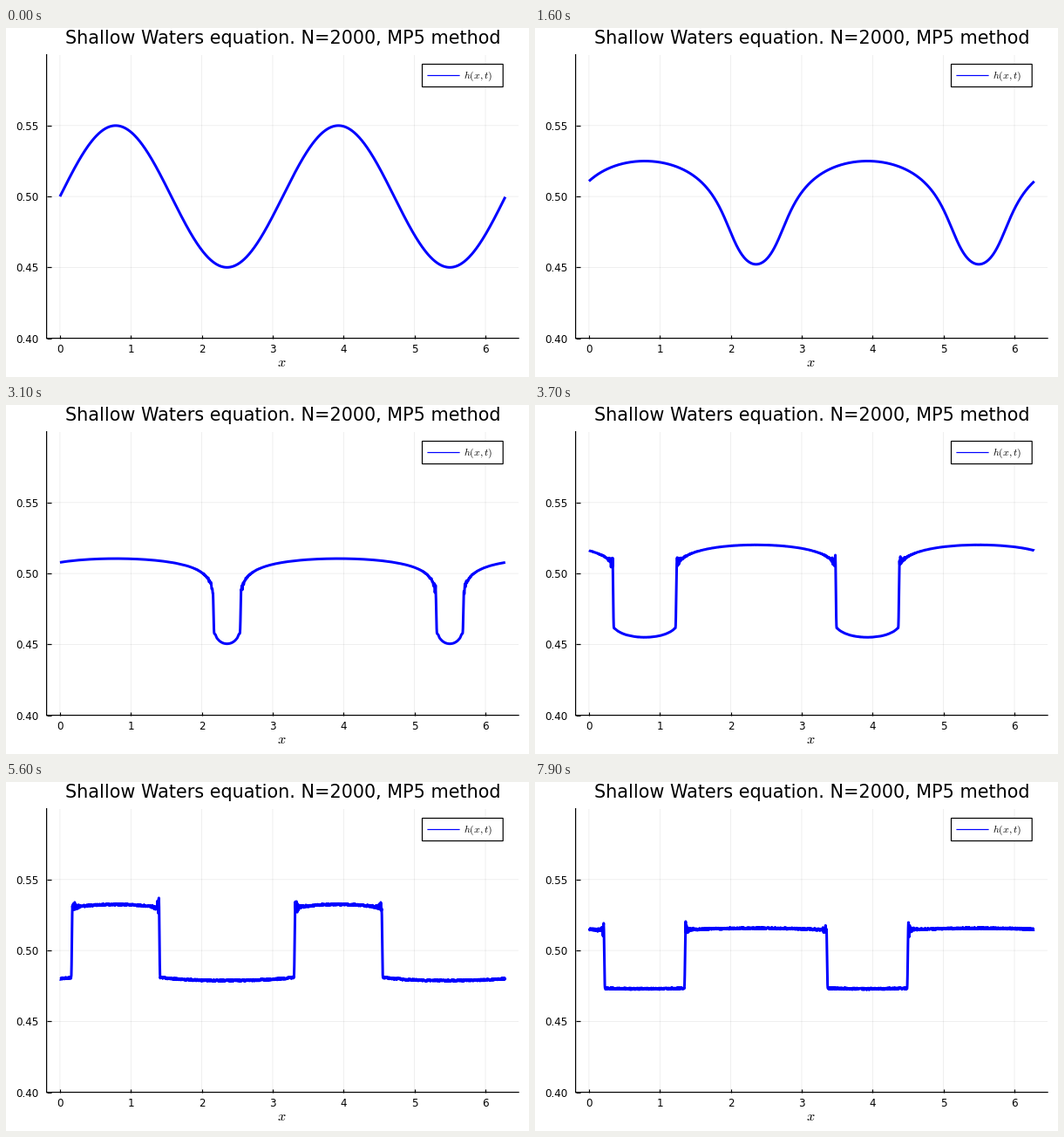
Animation of 600x400 px, one loop 8000 ms. Source, as a matplotlib script:

```python
import numpy as np
import matplotlib.pyplot as plt
from matplotlib.animation import FuncAnimation
from matplotlib.lines import Line2D
from matplotlib.patches import Rectangle

W, H, DPI = 600, 400, 100
PX = 72 / DPI              # points per pixel
FRAMES, STEP_MS = 80, 100
G = 9.81
CELLS, SUBSTEPS = 500, 160
BLUE = "#0000ff"

plt.rcParams.update({"font.family": "DejaVu Sans", "mathtext.fontset": "cm",
                     "path.snap": False})

# The wave is mirror symmetric about each crest, so half a wavelength is solved.
dx = np.pi / 2 / CELLS
dt = STEP_MS / 1000 / SUBSTEPS
centers = (np.arange(CELLS) + 0.5) * dx
MIRROR = np.array([[1.0], [-1.0]])


def flux(q):
    h, m = q
    return np.stack((m, m * m / h + 0.5 * G * h * h))


def rate(q, speed=2.5):
    """Shallow water, second order with van Leer slopes and wall boundaries."""
    p = np.concatenate((MIRROR * q[:, 1::-1], q, MIRROR * q[:, :-3:-1]), axis=1)
    d = p[:, 1:] - p[:, :-1]
    a, b = d[:, :-1], d[:, 1:]
    half = np.maximum(a * b, 0) / (a + b + 1e-30)
    mid = p[:, 1:-1]
    left = (mid + half)[:, :-1]
    right = (mid - half)[:, 1:]
    f = 0.5 * (flux(left) + flux(right) - speed * (right - left))
    return (f[:, :-1] - f[:, 1:]) / dx


def solve():
    q = np.stack((0.5 + 0.05 * np.cos(2 * centers), np.zeros(CELLS)))
    heights = [q[0].copy()]
    for _ in range(FRAMES - 1):
        for _ in range(SUBSTEPS):
            q1 = q + dt * rate(q)
            q = 0.5 * (q + q1 + dt * rate(q1))
        heights.append(q[0].copy())
    return heights


x = np.arange(2000) * 2 * np.pi / 2000
offset = (x - np.pi / 4 + np.pi / 2) % np.pi - np.pi / 2
dist = np.abs(offset)
side = 2 * ((x + np.pi / 4) // np.pi).astype(int) + (offset > 0)


def ringing(h, n):
    """Fine noise, plus ripples that trail each shock on its high side."""
    rng = np.random.default_rng(100 + n)
    noise = 0.0006 * np.clip((n - 36) / 16, 0, 1) * rng.uniform(-1, 1, x.size)
    jump = np.diff(h)
    k = np.argmax(np.abs(jump))
    if abs(jump[k]) < 0.006:
        return noise
    near = h[max(k - 6, 0):k + 8]
    size = near.max() - near.min()
    s = np.sign(jump[k]) * (dist - (k + 1) * dx)
    behind = np.maximum(s, 0)

    knots = np.arange(0, x.size + 3, 3)
    swing = (-1.0) ** np.arange(knots.size) * rng.uniform(0.2, 1, knots.size)
    ripple = np.interp(np.arange(x.size), knots, swing)
    trail = 0.16 * np.exp(-behind / 0.035) + 0.02 * np.exp(-behind / 0.15)
    gain = rng.uniform(0.08, 0.24, side.max() + 1)[side]
    spike = gain * np.exp(-((s - 0.009) / 0.005) ** 2)
    return noise + size * (trail * ripple * (s > 0.012) + spike * (s > 0.003))


curves = []
for i, h in enumerate(solve()):
    curves.append(np.interp(dist, centers, h) + ringing(h, i))

fig = plt.figure(figsize=(W / DPI, H / DPI), dpi=DPI, facecolor="white")
x0, x1, y0, y1 = 46.6, 588.1, 30.6, 355.6
ax = fig.add_axes([x0 / W, 1 - y1 / H, (x1 - x0) / W, (y1 - y0) / H])
span = x[-1]
ax.set(xlim=(-0.03 * span, 1.03 * span), ylim=(0.4, 0.6),
       xticks=range(7), yticks=[0.40, 0.45, 0.50, 0.55])
ax.yaxis.set_major_formatter("{x:.2f}")
ax.set_axisbelow(True)
ax.grid(color="black", alpha=0.1, lw=0.6 * PX)
ax.spines[["top", "right"]].set_visible(False)
ax.spines[["left", "bottom"]].set_linewidth(1.2 * PX)
ax.tick_params(direction="in", length=4.5 * PX, width=1.2 * PX,
               labelsize=11.87 * PX)
ax.tick_params(axis="x", pad=6 * PX)
ax.tick_params(axis="y", pad=8.8 * PX)


def label(px, py, text, size, ha="center"):
    fig.text(px / W, 1 - py / H, text, fontsize=size * PX, ha=ha, va="baseline")


label(317.5, 18.2, "Shallow Waters equation. N=2000, MP5 method", 20.76)
label(316.7, 388, "$x$", 16.3)

fig.add_artist(Rectangle((477.5 / W, 1 - 67.5 / H), 92.7 / W, 26 / H,
                         fc="white", ec="black", lw=1.2 * PX))
fig.add_artist(Line2D([484 / W, 520 / W], [1 - 54.5 / H] * 2,
                      color=BLUE, lw=1.2 * PX))
label(525, 58, "$h(x,t)$", 11.87, "left")

wave, = ax.plot(x, curves[0], color=BLUE, lw=3 * PX, clip_on=False,
                solid_capstyle="butt", solid_joinstyle="round")


def draw(n):
    wave.set_ydata(curves[n])
    return wave,


anim = FuncAnimation(fig, draw, frames=FRAMES, interval=STEP_MS,
                     repeat=True, repeat_delay=0, cache_frame_data=False)
plt.show()
```
